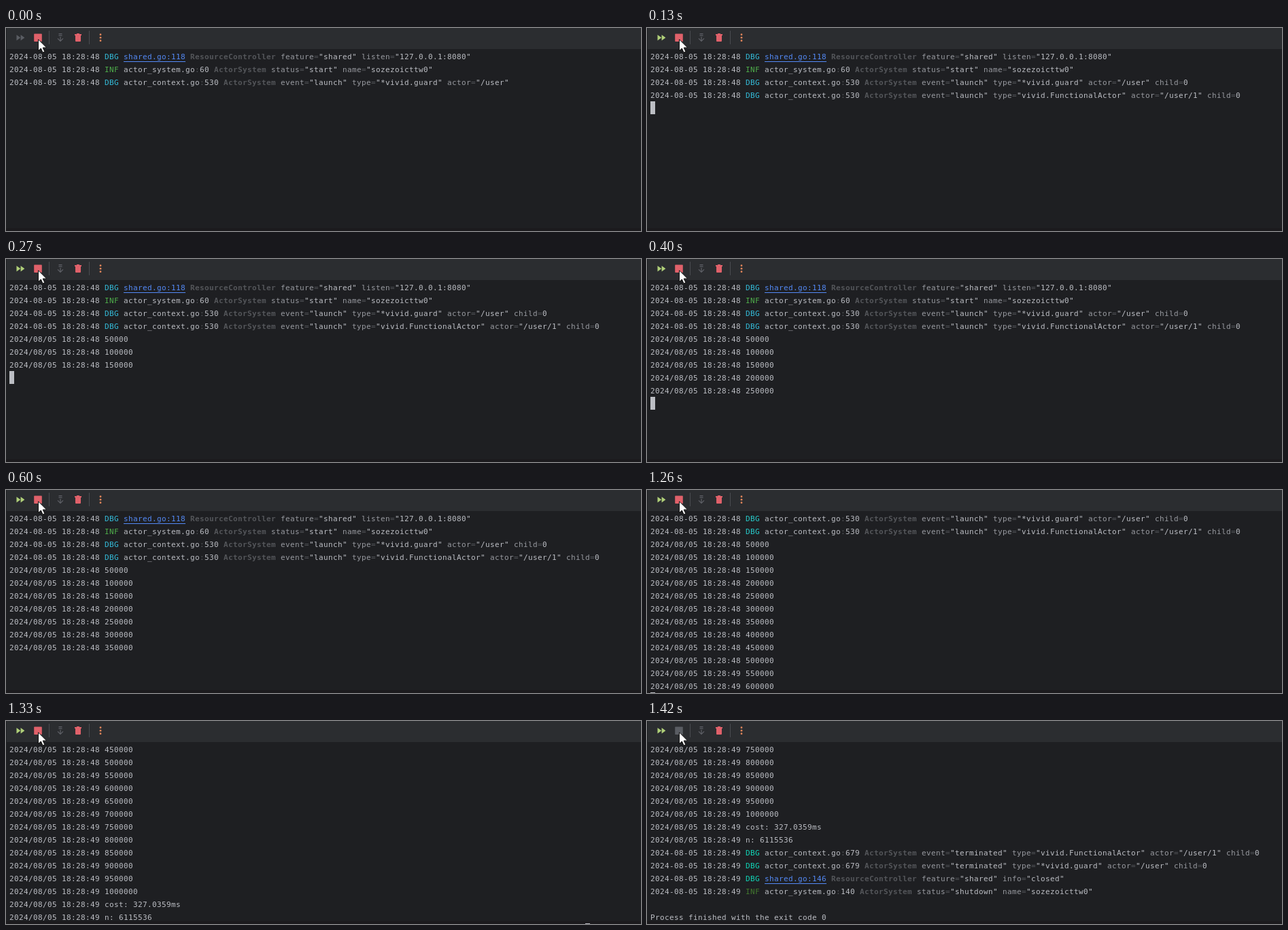
An HTML page that plays this animation: 934x299 px, repeating every 3.47 s.

```html
<!DOCTYPE html>
<html lang="en">
<head>
<meta charset="utf-8">
<title>Console run</title>
<style>
html, body { margin: 0; width: 100%; height: 100%; overflow: hidden; background: #1e1f22; }
#stage { position: absolute; left: 0; top: 0; width: 934px; height: 299px; overflow: hidden; }
#bar { position: absolute; left: 0; top: 0; }
#edge { position: absolute; left: 0; top: 295px; width: 934px; height: 4px; background: #1b1a1d; }
#log { font: 11px/21px "DejaVu Sans Mono", "Liberation Mono", monospace; color: #bcbec4; white-space: pre; }
#log span { position: absolute; height: 21px; }
#log .dim { color: #54565a; }
#log .sys { color: #54565a; font-weight: bold; }
#log .key { color: #989aa0; }
#log .link { color: #548af7; }
#log .link::after { content: ""; position: absolute; left: 0; right: 0; top: 17px; height: 1px; background: currentColor; }
#log .DBG { color: var(--dbg); }
#log .INF { color: var(--inf); }
#caret { position: absolute; width: 7px; height: 19px; background: #bcbec4; }
</style>
</head>
<body>
<div id="stage">
  <div id="edge"></div>
  <div id="log"></div>
  <div id="caret"></div>
  <svg id="bar" width="934" height="40" viewBox="0 0 934 40">
    <rect width="934" height="31" fill="#2b2d30"/>
    <rect width="1" height="31" fill="#1e1f22"/>
    <path id="rerun" d="M15.5 10v8.6l5.8-4.3zM21.6 10v8.6l5.8-4.3z"/>
    <rect id="stop" x="41.2" y="8.6" width="11.6" height="11.4" rx="0.8"/>
    <path d="M63.5 4v20M122.5 4v20" stroke="#4a4c50"/>
    <path d="M77.5 8.6h5M77.5 11.2h5M80 13v6.5M76 15.4l4 4.1l4-4.1" fill="none" stroke="#5f6167" stroke-width="1.2"/>
    <path d="M104 8h4v1h3v2h-10v-2h3zM102 11h8v8q0 1-1 1h-6q-1 0-1-1z" fill="#e0616a"/>
    <g fill="#e0855a">
      <circle cx="139" cy="9.7" r="1.4"/><circle cx="139" cy="14.2" r="1.4"/><circle cx="139" cy="18.7" r="1.4"/>
    </g>
    <path d="M47.5 16.8v16.8l3.9-3.6l2.7 6.1l2.8-1.2l-2.7-5.9h5.4z" fill="#fff" stroke="#111" stroke-width="1"/>
  </svg>
</div>
<script>
const LOOP = 3470, CELL = 7, ROW = 19;
const $ = id => document.getElementById(id);

const entry = (sec, level, file, line, sys, rest) =>
  ({ stamp: `2024-08-05 18:28:${sec} `, level, file, line, sys, rest });
const plain = (sec, text) => `2024/08/05 18:28:${sec} ${text}`;

const guard = 'type="*vivid.guard" actor="/user" child=0';
const functional = 'type="vivid.FunctionalActor" actor="/user/1" child=0';
const lines = [
  entry(48, "DBG", "shared.go", 118, "ResourceController", 'feature="shared" listen="127.0.0.1:8080"'),
  entry(48, "INF", "actor_system.go", 60, "ActorSystem", 'status="start" name="sozezoicttw0"'),
  entry(48, "DBG", "actor_context.go", 530, "ActorSystem", 'event="launch" ' + guard),
  entry(48, "DBG", "actor_context.go", 530, "ActorSystem", 'event="launch" ' + functional)
];
for (let n = 50000; n <= 1000000; n += 50000) lines.push(plain(n > 500000 ? 49 : 48, n));
lines.push(
  plain(49, "cost: 327.0359ms"),
  plain(49, "n: 6115536"),
  entry(49, "DBG", "actor_context.go", 679, "ActorSystem", 'event="terminated" ' + functional),
  entry(49, "DBG", "actor_context.go", 679, "ActorSystem", 'event="terminated" ' + guard),
  entry(49, "DBG", "shared.go", 146, "ResourceController", 'feature="shared" info="closed"'),
  entry(49, "INF", "actor_system.go", 140, "ActorSystem", 'status="shutdown" name="sozezoicttw0"'),
  "",
  "Process finished with the exit code 0"
);

// from/to: visible slice of the log; caret: [row, column]
const steps = [
  { at: 0, from: 0, to: 3, idle: true, cut: true },
  { at: 130, from: 0, to: 4, caret: [4, 0] },
  { at: 200, from: 0, to: 5, caret: [5, 0] },
  { at: 270, from: 0, to: 7, caret: [7, 0] },
  { at: 400, from: 0, to: 9, caret: [9, 0] },
  { at: 600, from: 0, to: 11 },
  { at: 1260, from: 2, to: 16, caret: [14, 0], dbg: "#28cccc" },
  { at: 1330, from: 12, to: 26, caret: [14, 121] },
  { at: 1420, from: 18, to: 32, done: true, dbg: "#10d6b8", inf: "#43782f" }
];

function tokens(item) {
  if (typeof item === "string") return [["", item]];
  const { stamp, level, file, line, sys, rest } = item;
  const place = file === "shared.go"
    ? [["link", `${file}:${line}`]]
    : [["", file], ["dim", ":"], ["", line]];
  const out = [["", stamp], [level, level], ["", " "], ...place, ["", " "], ["sys", sys]];
  for (const pair of rest.split(" ")) {
    const [key, value] = pair.split("=");
    out.push(["", " "], ["key", key], ["dim", "="], ["", value]);
  }
  return out;
}

function addLine(box, item, row) {
  let col = 0;
  for (const [kind, value] of tokens(item)) {
    const text = String(value);
    if (text.trim()) {
      const span = document.createElement("span");
      span.className = kind;
      span.textContent = text;
      span.style.left = 5 + col * CELL + "px";
      span.style.top = 32 + row * ROW + "px";
      box.append(span);
    }
    col += text.length;
  }
}

// The terminal rounds each glyph's advance up to a whole cell.
function fitCells(box) {
  const probe = document.createElement("span");
  probe.textContent = "0".repeat(100);
  box.append(probe);
  box.style.letterSpacing = CELL - probe.getBoundingClientRect().width / 100 + "px";
}

function show(step) {
  const log = $("log"), caret = $("caret");
  log.replaceChildren();
  log.style.setProperty("--dbg", step.dbg || "#34bcda");
  log.style.setProperty("--inf", step.inf || "#4fae4b");
  lines.slice(step.from, step.to).forEach((item, row, all) => {
    const cut = step.cut && row === all.length - 1;
    addLine(log, cut ? { ...item, rest: item.rest.replace(" child=0", "") } : item, row);
  });
  caret.style.display = step.caret ? "block" : "none";
  if (step.caret) {
    caret.style.top = 32 + step.caret[0] * ROW + "px";
    caret.style.left = 5 + step.caret[1] * CELL + "px";
  }
  $("rerun").setAttribute("fill", step.idle ? "#5a5d63" : "#b0d079");
  $("stop").setAttribute("fill", step.done ? "#5a5d63" : "#e0616a");
}

let current;
const start = performance.now();
function tick() {
  const t = (performance.now() - start) % LOOP;
  const step = steps.findLast(s => s.at <= t);
  if (step !== current) show(current = step);
  requestAnimationFrame(tick);
}
fitCells($("log"));
tick();
</script>
</body>
</html>
```
